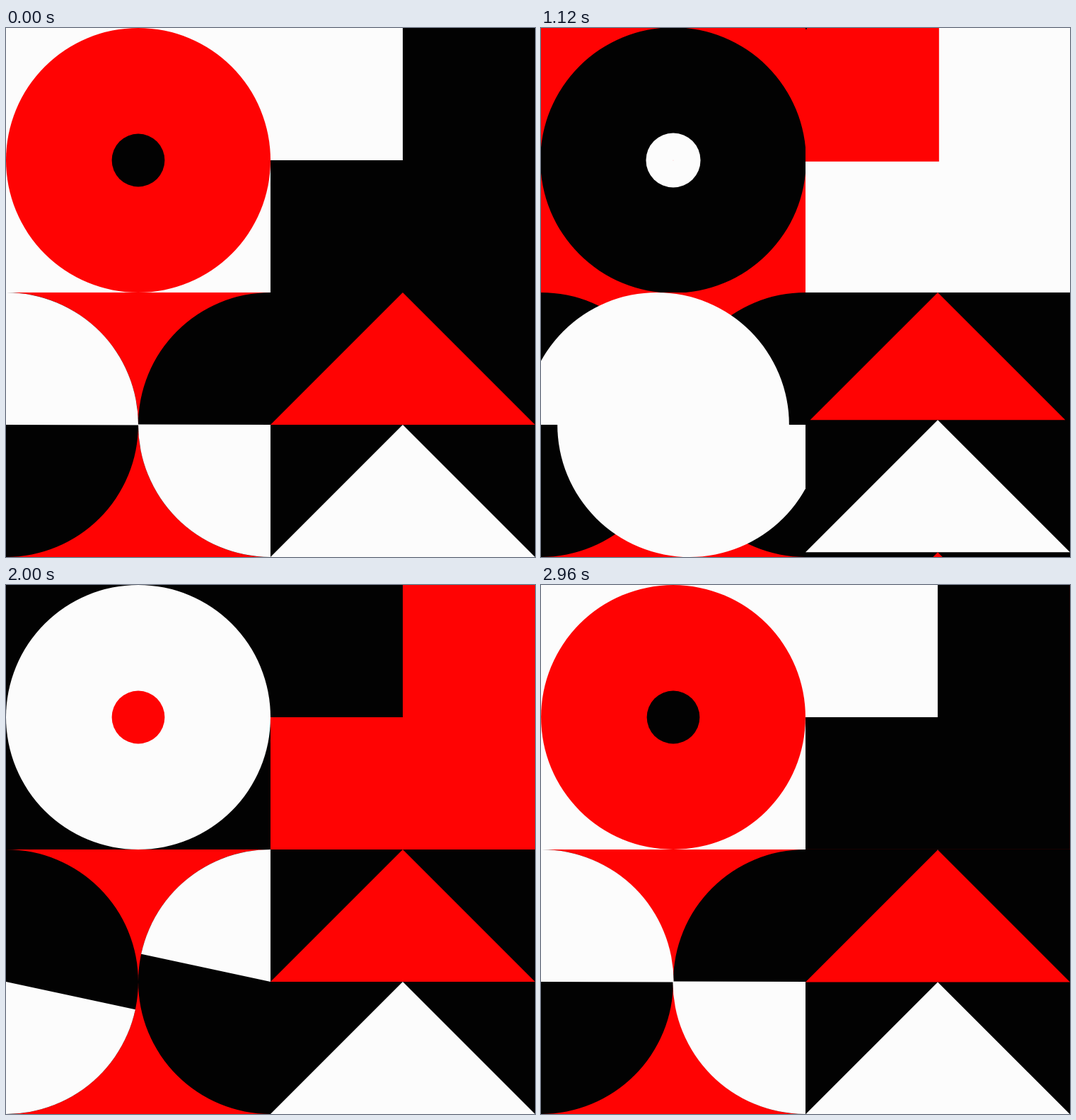
Write an HTML page with a canvas that moves like this. It is 748 px wide and 748 px high and loops after 3 s.

```html
<!DOCTYPE html>
<html>
<head>
<meta charset="utf-8">
<style>
  html, body { margin: 0; width: 100%; height: 100%; overflow: hidden; background: #020202; }
  canvas { display: block; }
</style>
</head>
<body>
<canvas id="stage" width="748" height="748"></canvas>
<script>
const ctx = document.getElementById('stage').getContext('2d');
const WHITE = '#fcfcfc', RED = '#ff0303', BLACK = '#020202';
const CYCLE = [WHITE, RED, BLACK];
const CELL = 374, HALF = 187;

const color = i => CYCLE[i % 3];
const mix = (a, b, p) => a + (b - a) * p;

// Cubic Bezier easing, solved by bisection.
function bezier(x1, y1, x2, y2) {
  const at = (a, b, s) => 3 * (1 - s) * (1 - s) * s * a + 3 * (1 - s) * s * s * b + s * s * s;
  return x => {
    if (x <= 0) return 0;
    if (x >= 1) return 1;
    let lo = 0, hi = 1;
    for (let i = 0; i < 30; i++) {
      const mid = (lo + hi) / 2;
      if (at(x1, x2, mid) < x) lo = mid; else hi = mid;
    }
    return at(y1, y2, lo);
  };
}

const easeRings = bezier(.95, 0, .1, 1);
const easeSquares = bezier(.86, 0, .1, 1);
const easeClimb = bezier(.97, 0, .18, 1);
const easeSpin = bezier(.6, 0, .25, 1.447);
const easeSlide = bezier(.656, 0, .394, 1);

function cell(col, row, fill, draw) {
  ctx.save();
  ctx.translate(col * CELL, row * CELL);
  ctx.beginPath();
  ctx.rect(0, 0, CELL, CELL);
  ctx.clip();
  ctx.fillStyle = fill;
  ctx.fillRect(0, 0, CELL, CELL);
  draw();
  ctx.restore();
}

function disc(x, y, r, fill, from = 0, to = 2 * Math.PI) {
  ctx.fillStyle = fill;
  ctx.beginPath();
  ctx.arc(x, y, r, from, to);
  ctx.fill();
}

function square(size, fill) {
  ctx.fillStyle = fill;
  ctx.fillRect(0, 0, size, size);
}

function triangle(y, size, fill) {
  ctx.fillStyle = fill;
  ctx.beginPath();
  ctx.moveTo(HALF, y);
  ctx.lineTo(HALF + size, y + size);
  ctx.lineTo(HALF - size, y + size);
  ctx.fill();
}

function rings(t) {
  const n = Math.floor(t), p = easeRings(t - n);
  const radii = [0, 37.4, HALF, 297];
  cell(0, 0, color(n), () => {
    for (let i = 2; i >= 0; i--)
      disc(HALF, HALF, mix(radii[i], radii[i + 1], p), color(n + 3 - i));
  });
}

function squares(t) {
  const n = Math.floor(t), p = easeSquares(t - n);
  cell(1, 0, color(n + 2), () => {
    square(HALF * (1 + p), color(n + 3));
    square(HALF * p, color(n + 4));
  });
}

// White halves spin in place, then trade sides over black discs.
function halves(t) {
  const u = t % 1.5;
  const spin = easeSpin(u / .75), slide = easeSlide((u - .7) / .8);
  const turn = (.15 + 179.7 * spin + .3 * slide) * Math.PI / 180;
  const x = CELL * slide;
  cell(0, 1, RED, () => {
    disc(0, HALF, HALF, BLACK);
    disc(CELL, HALF, HALF, BLACK);
    disc(x, HALF, HALF, WHITE, turn + Math.PI, turn + 2 * Math.PI);
    disc(CELL - x, HALF, HALF, WHITE, turn, turn + Math.PI);
  });
}

function triangles(t) {
  const n = Math.floor(t * 2), p = easeClimb(t * 2 - n);
  const tone = i => (n + i) % 2 ? WHITE : RED;
  cell(1, 1, BLACK, () => {
    triangle(0, HALF * (1 - p), tone(0));
    triangle(HALF * (1 - p), HALF, tone(1));
    triangle(HALF * (2 - p), HALF, tone(2));
  });
}

function render(now) {
  // Motion authored at 30 fps, shown at 25 fps.
  const step = Math.floor((now % 3000) / 40);
  const t = Math.round(step * 1.2) / 30;
  rings(t);
  squares(t);
  halves(t);
  triangles(t);
}

let start;
function tick(now) {
  start ??= now;
  render(now - start);
  requestAnimationFrame(tick);
}
render(0);
requestAnimationFrame(tick);
</script>
</body>
</html>
```
